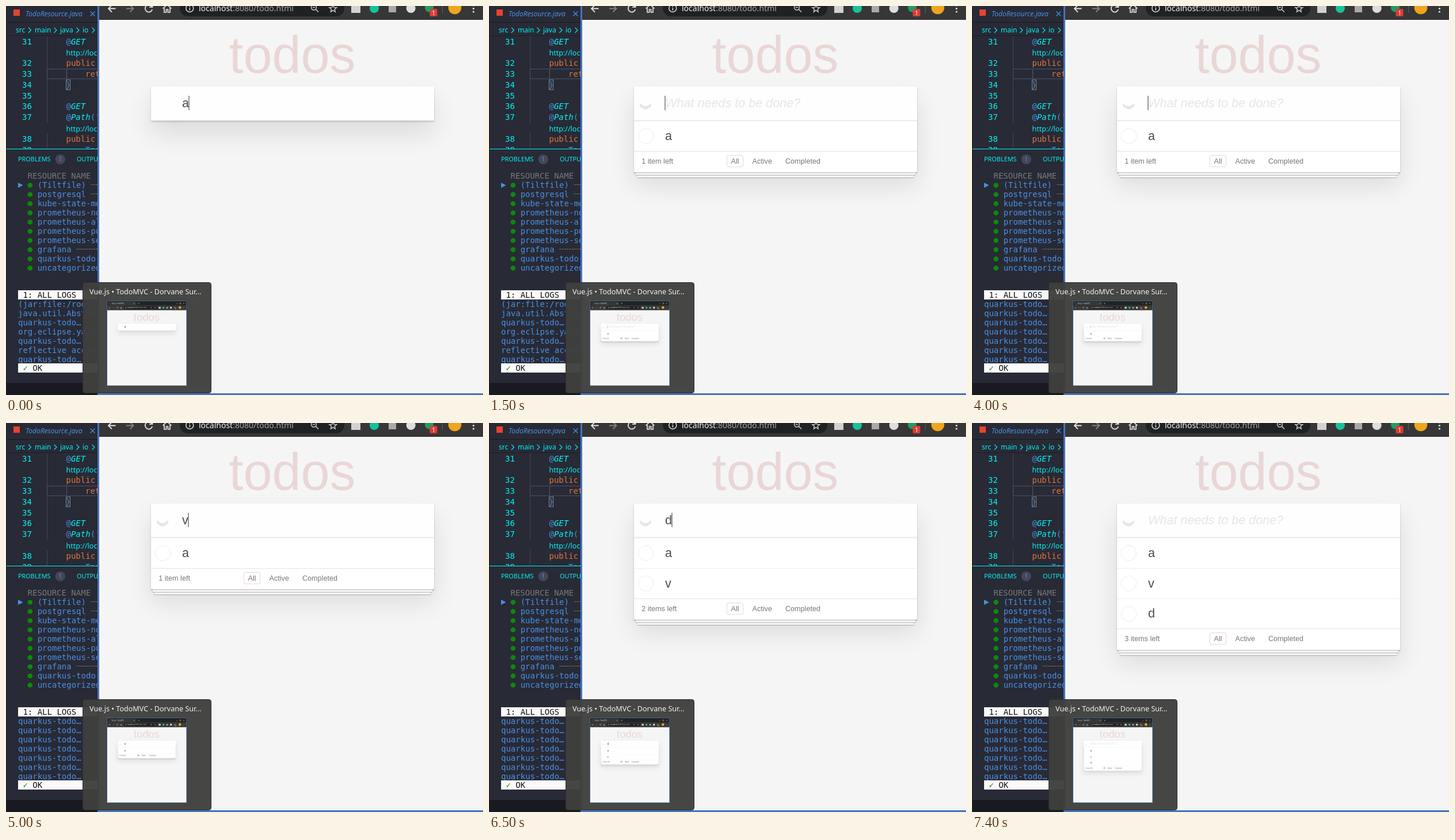
Animation of 829x676 px, one loop 8 s. Source, as an HTML page:

```html
<!DOCTYPE html>
<html lang="en">
<head>
<meta charset="utf-8">
<title>Todo list</title>
<style>
html, body { margin: 0; width: 100%; height: 100%; overflow: hidden; background: #282a36; }
svg { display: block; }
text { white-space: pre; }
.ui { font-family: "Noto Sans", "Open Sans", sans-serif; }
.mono { font-family: "DejaVu Sans Mono", monospace; font-size: 14px; }
.web { font-family: "Liberation Sans", Arial, sans-serif; }
</style>
</head>
<body>
<svg id="stage" width="829" height="676" viewBox="0 0 829 676"></svg>
<script>
const BLUE = '#4a90e2', CYAN = '#00f5f5', ORANGE = '#e0753c', GREEN = '#0b8a0b', FRAME = '#4573bf';
const LOOP = 8000;

const rect = (x, y, w, h, fill, extra = '') =>
  `<rect x="${x}" y="${y}" width="${w}" height="${h}" fill="${fill}" ${extra}/>`;
const circle = (x, y, r, fill, extra = '') =>
  `<circle cx="${x}" cy="${y}" r="${r}" fill="${fill}" ${extra}/>`;
const path = (d, stroke, w = 1, extra = '') =>
  `<path d="${d}" fill="none" stroke="${stroke}" stroke-width="${w}" ${extra}/>`;
const text = (cls, x, y, str, fill, extra = '') =>
  `<text class="${cls}" x="${x}" y="${y}" fill="${fill}" ${extra}>${str}</text>`;
const ui = (x, y, str, fill, size, extra = '') => text('ui', x, y, str, fill, `font-size="${size}" ${extra}`);
const mono = (x, y, str, fill, extra = '') => text('mono', x, y, str, fill, extra);
const web = (x, y, str, fill, size, extra = '') => text('web', x, y, str, fill, `font-size="${size}" ${extra}`);
const span = (str, fill) => `<tspan fill="${fill}" font-style="normal">${str}</tspan>`;

// ---- editor and terminal on the left ----

function editor() {
  let s = rect(0, 0, 159, 676, '#282a36');
  s += rect(13, 6, 11, 11, '#e8432e');
  s += ui(34, 18, 'TodoResource.java', BLUE, 12, 'font-style="italic"');
  s += path('M146.5 9.5l8 8m0-8l-8 8', BLUE, 1.2);
  s += rect(0, 28, 159, 1, '#191a21');
  [['src', 17], ['main', 50], ['java', 94], ['io', 133]].forEach(([w, x]) => s += ui(x, 46, w, CYAN, 12));
  [39, 83.5, 122.5, 149.5].forEach(x => s += path(`M${x} 37.5l4.5 4.5l-4.5 4.5`, CYAN, 1.1));
  s += rect(0, 51, 159, 1, '#1d1e28');

  s += rect(71, 53, 1, 150, '#424555') + rect(71, 221, 1, 27, '#424555') + rect(105, 109, 1, 18, '#565a70');
  s += rect(71.5, 109.5, 100, 17, 'none', 'stroke="#4e5266"');
  s += rect(104.5, 128.5, 7, 17, 'none', 'stroke="#8a8a8a"');
  const lines = [67, 104, 123, 142, 161, 179, 198, 236, 255];
  lines.forEach((y, i) => s += mono(28, y, 31 + i, CYAN));
  const note = (y, name) => mono(104.5, y, span('@', BLUE) + name, CYAN, 'font-style="italic"');
  s += note(67, 'GET') + note(179, 'GET') + note(198, 'Path' + span('(', BLUE) + span("'", ORANGE));
  [85.5, 217.5].forEach(y => s += ui(104.5, y, 'http://localhost', CYAN, 12.5));
  [104, 236].forEach(y => s += mono(104.5, y, 'public', ORANGE));
  s += mono(138, 123, 'return', ORANGE) + mono(103.8, 142, '}', BLUE) + mono(138, 255, 'Todo', BLUE);

  s += rect(0, 248, 159, 428, '#282a36') + rect(0, 248, 159, 1, CYAN);
  s += ui(21, 270, 'PROBLEMS', CYAN, 10.9) + ui(123, 270, 'OUTPUT', CYAN, 10.9);
  s += circle(94.3, 266.3, 8.6, '#44475a') + ui(94.3, 270, '1', BLUE, 10.5, 'text-anchor="middle"');

  s += mono(37.5, 300, 'RESOURCE NAME', '#787878');
  s += `<path d="M21 307l8.5 4.5l-8.5 4.5z" fill="${BLUE}"/>`;
  ['(Tiltfile)', 'postgresql', 'kube-state-metrics', 'prometheus-node', 'prometheus-alert', 'prometheus-push',
   'prometheus-server', 'grafana', 'quarkus-todo-app', 'uncategorized'].forEach((name, i) => {
    const y = 311.5 + 16 * i, end = 55 + 8.43 * (name.length + 1);
    s += circle(41.8, y, 4.3, GREEN) + mono(54.7, y + 4.5, name, BLUE);
    if (end < 159) s += path(`M${end} ${y - 1}H159`, '#787878', 1, 'stroke-dasharray="3 1.2"');
  });

  s += rect(21, 494, 138, 16, '#fafafa') + mono(29.4, 507, '1: ALL LOGS', '#111');
  s += '<g id="logs"></g>';
  s += rect(21, 621, 138, 16, '#fafafa') + mono(29.4, 634, span('✓', GREEN) + ' OK', '#111');
  s += rect(0, 655, 159, 21, '#191a21') + rect(0, 0, 1, 676, '#1d1e28');
  return s;
}

const APP = 'quarkus-todo…';
const LOG = ['(jar:file:/root/', 'java.util.Abstract', APP, 'org.eclipse.yasson', APP, 'reflective access', APP];
function logs(shift) {
  let s = '';
  for (let i = 0; i < 7; i++) s += mono(21, 523 + 16 * i, LOG[i + shift] || APP, BLUE);
  return s;
}

// ---- browser window, also shown small in the preview ----

function toolbar() {
  const W = '#e4e4e4';
  let s = rect(162, -51, 680, 75, '#373737') + rect(162, -51, 680, 34, '#232323');
  s += rect(168, -46, 240, 30, '#373737', 'rx="6"') + ui(200, -27, 'Vue.js • TodoMVC', '#ccc', 13);
  s += path('M386-36l8 8m0-8l-8 8M424-32h12m-6-6v12M750-31h10M779-37h9v9h-9zM808-37l9 9m0-9l-9 9', '#ddd', 2);
  s += path('M190.5 4.5H178m6-6l-6 6l6 6', W, 1.8);
  s += path('M209 4.5h12.5m-6-6l6 6l-6 6', '#828282', 1.8);
  s += path('M253.5 1A6.3 6.3 0 1 0 254.2 6M254.5-4V1.8H249', W, 1.8);
  s += path('M272.5 4.5L280-2.5L287.5 4.5M275 3.5V11H278.5V6H281.5V11H285V3.5', W, 1.7);
  s += rect(302, -10, 286, 28, '#202124', 'rx="14"');
  s += circle(319.3, 4, 6.5, 'none', `stroke="${W}" stroke-width="1.4"`);
  s += rect(318.6, 3.2, 1.5, 4.3, W) + rect(318.6, .5, 1.5, 1.5, W);
  s += ui(335, 9, 'localhost<tspan fill="#a5a5a5">:8080/todo.html</tspan>', '#f0f0f0', 14);
  s += circle(535, 2.5, 4.4, 'none', 'stroke="#ccc" stroke-width="1.5"');
  s += path('M538.2 5.7L543 10.5M533 2.5h4', '#ccc', 1.6);
  let star = '';
  for (let i = 0; i < 10; i++) {
    const a = i * Math.PI / 5, r = i % 2 ? 2.9 : 6.7;
    star += `${i ? 'L' : 'M'}${(568.3 + r * Math.sin(a)).toFixed(1)} ${(4.7 - r * Math.cos(a)).toFixed(1)}`;
  }
  s += path(star + 'z', '#ccc', 1.4);
  s += rect(600, -3, 16, 15, '#d2d2d2') + circle(640, 4, 8, '#15c39a') + rect(665, -2, 13, 13, '#a9a9a9');
  s += circle(703.7, 4, 8, '#dedede') + circle(735.5, 3, 7.5, '#1f9d63');
  s += rect(736.5, 5, 13, 13, '#dc3c34', 'rx="2"') + ui(743, 15.5, '1', '#fff', 10, 'text-anchor="middle"');
  s += rect(758, -5, 1, 17, '#5f5f5f') + circle(780, 3, 11.3, '#f0a51c');
  [-1, 4.5, 10].forEach(y => s += circle(812.5, y, 1.6, W));
  return s + rect(162, 23, 680, 1, '#262626');
}

const ROW = 52.7, LIST = 199.3;
const WIDTHS = { a: 12, d: 12, v: 11 };

function card(n, typed, caret) {
  const foot = LIST + ROW * n, bottom = n ? foot + 37.2 : LIST;
  const shade = (dy, blur, alpha) =>
    rect(252, 140 + dy, 492, bottom - 140, '#000', `opacity="${alpha}" style="filter:blur(${blur}px)"`);
  const sheet = (inset, dy, fill, extra) => rect(252 + inset, bottom - 20, 492 - 2 * inset, 20 + dy, fill, extra);
  const edge = blur => `opacity=".3" style="filter:blur(${blur}px)"`;
  let s = shade(22.5, 22.5, .1) + shade(1.8, 1.8, .2);
  if (n) {
    s += sheet(5.4, 9.9, '#000', edge(.7)) + sheet(5.4, 9, '#f6f6f6');
    s += sheet(2.7, 5.4, '#000', edge(.45)) + sheet(2.7, 4.5, '#f6f6f6');
    s += sheet(0, .9, '#000', edge(.45));
  }
  s += rect(252, 140, 492, bottom - 140, '#fff') + rect(252, 140, 492, 59, '#fefefe');
  s += rect(252, 197.5, 492, 1.5, '#f7f7f7');

  s += typed ? web(306, 176, typed, '#4d4d4d', 21.6)
             : web(306, 176, 'What needs to be done?', '#e6e6e6', 21.6, 'font-style="italic"');
  if (caret) s += rect(typed ? 305.5 + WIDTHS[typed] : 305.5, 156, 1, 25, '#333');
  if (!n) return s;

  s += '<path d="M262 168.8Q267 173.6 272 174.2Q277 173.6 282 168.8V174Q277 179.2 272 180Q267 179.2 262 174z" fill="#e6e6e6"/>';
  s += rect(252, 199, 492, 1, '#e0e0e0');
  [...'avd'].slice(0, n).forEach((name, i) => {
    const y = LIST + ROW * i;
    s += circle(272.5, y + 26.8, 13.2, 'none', 'stroke="#ededed"');
    s += web(306, Math.round(y + 33.7), name, '#4d4d4d', 21.6);
    if (i) s += rect(252, Math.round(y), 492, 1, '#ededed');
  });
  s += rect(252, Math.round(foot), 492, 1, '#e2e2e2');
  const base = Math.round(foot + 21.8);
  s += web(265.3, base, `${n} item${n > 1 ? 's' : ''} left`, '#777', 12.6);
  s += rect(413.5, Math.round(foot + 7) + .5, 28, 20, 'none', 'rx="2.7" stroke="#af2f2f" stroke-opacity=".2"');
  [['All', 420.5], ['Active', 457.6], ['Completed', 515]].forEach(([w, x]) => s += web(x, base, w, '#777', 12.6));
  return s;
}

function page(n, typed, caret) {
  return rect(162, 24, 680, 660, '#f5f5f5') + toolbar() +
    web(497.5, 115.5, 'todos', '#af2f2f', 90, 'text-anchor="middle" opacity=".15"') + card(n, typed, caret);
}

// ---- static frame ----

document.getElementById('stage').innerHTML =
  `<g id="window"></g>
  <svg width="159" height="676">${editor()}</svg>` +
  rect(159, 0, 3, 676, FRAME) + rect(162, 673, 667, 3, FRAME) +
  rect(133.5, 480.5, 223, 192, '#3f3f3e', 'fill-opacity=".96" rx="4" stroke="#2f2f2f"') +
  ui(145, 501, 'Vue.js • TodoMVC - Dorvane Sur...', '#f2f2f2', 12.6) +
  '<svg id="thumb" x="176" y="513" width="138" height="147" viewBox="162 -51 675.5 719.5"></svg>' +
  rect(175.5, 512.5, 138, 147, 'none', `stroke="${FRAME}" stroke-opacity=".6"`);

// time, items, typed letter, caret, log lines scrolled
const STEPS = [
  [0, 0, 'a', 1, 0], [500, 0, 'a', 0, 0], [1000, 0, 'a', 1, 0],
  [1500, 1, '', 1, 0], [1600, 1, '', 1, 3], [1700, 1, '', 1, 6], [2200, 1, '', 0, 6],
  [4000, 1, '', 1, 6], [4500, 1, '', 0, 6], [5000, 1, 'v', 1, 6],
  [5300, 2, '', 1, 6], [5900, 2, '', 0, 6], [6400, 2, '', 1, 6], [6500, 2, 'd', 1, 6],
  [6800, 3, '', 1, 6], [7400, 3, '', 0, 6]
];
const [win, thumb, log] = ['window', 'thumb', 'logs'].map(id => document.getElementById(id));
let shown;

function draw() {
  const t = performance.now() % LOOP;
  const step = STEPS.filter(s => s[0] <= t).pop();
  if (step !== shown) {
    shown = step;
    const [, n, typed, caret, shift] = step;
    win.innerHTML = thumb.innerHTML = page(n, typed, caret);
    log.innerHTML = logs(shift);
  }
  requestAnimationFrame(draw);
}
draw();
</script>
</body>
</html>
```
